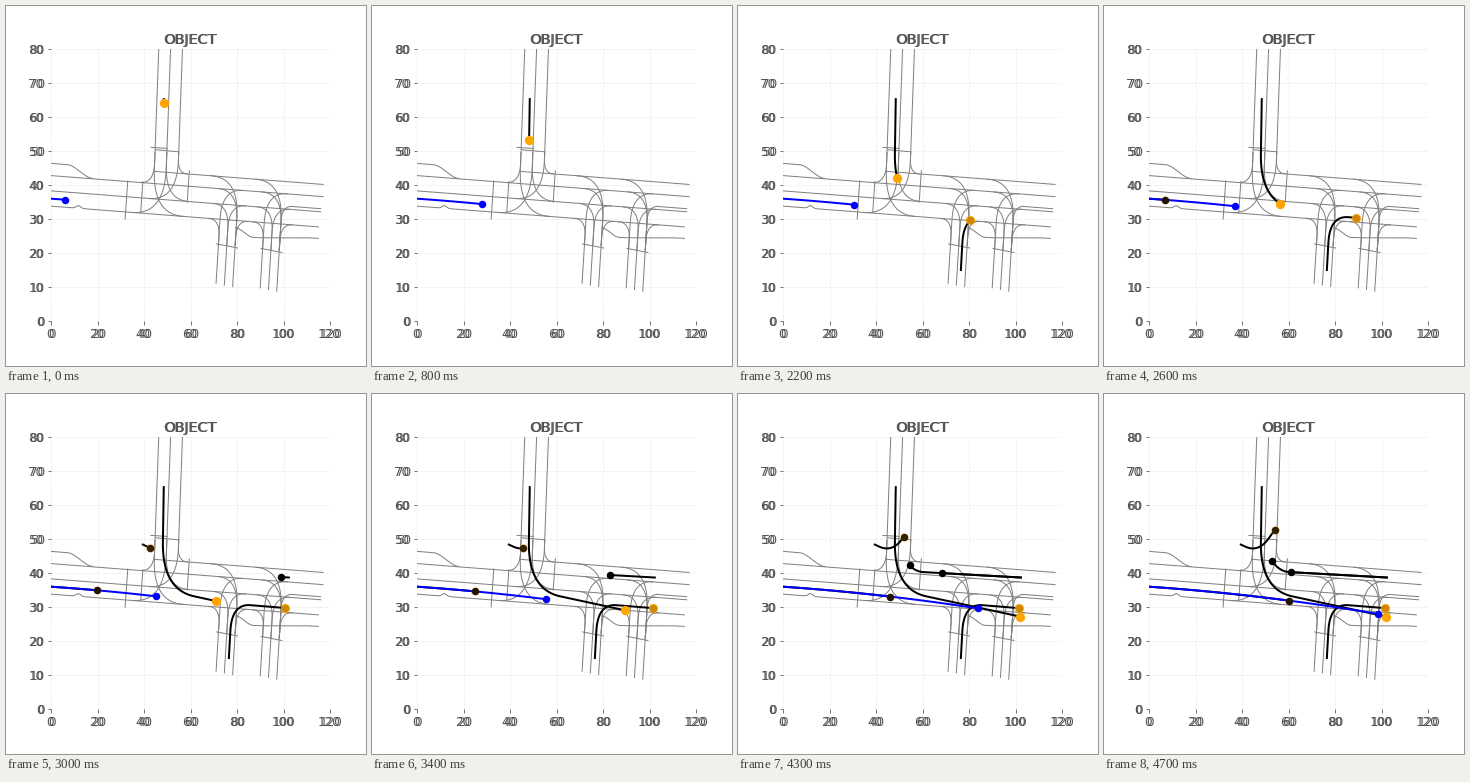
These frames come from a looping animation (360 by 360 pixels, 4.8 s). A matplotlib script:

```python
import numpy as np
import matplotlib.pyplot as plt
from matplotlib.animation import FuncAnimation

FRAMES, INTERVAL = 48, 100
INK, LANE, GRID = "#555555", "#808080", "#e9e9e9"
TILT = 0.053                     # downhill slope of the main road
LANES = (46.4, 42.8, 38.3, 33.8)  # main road heights at x = 0

plt.rcParams["font.family"] = "DejaVu Sans"
fig = plt.figure(figsize=(5, 5), dpi=72, facecolor="white")
ax = fig.add_axes([0.125, 0.125, 0.775, 0.755])
ax.set(xlim=(0, 120), ylim=(0, 80),
       xticks=range(0, 121, 20), yticks=range(0, 81, 10))
ax.tick_params(color=INK, length=3.5, width=0.8, labelbottom=False, labelleft=False)
ax.grid(color=GRID, linestyle="--", linewidth=0.7)
ax.set_axisbelow(True)
for spine in ax.spines.values():
    spine.set_visible(False)


def label(text, xy, dx, dy, ha, va, size=12, coords="data"):
    """Text struck twice, slightly apart."""
    for shift in (-0.7, 0.7):
        ax.annotate(text, xy, (dx + shift, dy), xycoords=coords, textcoords="offset points",
                    ha=ha, va=va, size=size, color=INK)


label("OBJECT", (0.5, 1), 0, 5, "center", "baseline", 14.4, "axes fraction")
for x in ax.get_xticks():
    label(f"{x:.0f}", (x, 0), 0, -7, "center", "top")
for y in ax.get_yticks():
    label(f"{y:.0f}", (0, y), -7, 0, "right", "center_baseline")


def smooth(x, a, b):
    s = np.clip((x - a) / (b - a), 0, 1)
    return s * s * (3 - 2 * s)


def bend(a, corner, b, r):
    """Straight legs joined by a rounded corner."""
    a, corner, b = (np.array(p, float) for p in (a, corner, b))
    p, q = (corner + r * (e - corner) / np.linalg.norm(e - corner) for e in (a, b))
    s = np.linspace(0, 1, 30)[:, None]
    return np.vstack([a, (1 - s) ** 2 * p + 2 * s * (1 - s) * corner + s ** 2 * q, b])


def road(x, y):
    ax.plot(x, y, color=LANE, lw=1, zorder=2)


def main_lane(c, x0, x1, change=lambda x: 0):
    x = np.linspace(x0, x1, 200)
    road(x, c - TILT * x + change(x))


def arm_lane(x0, lean, y0, y1):
    road([x0 + lean * y0, x0 + lean * y1], [y0, y1])


def turn(x0, lean, y0, c, side, r):
    """From a side arm into the main lane c; side is -1 for west, 1 for east."""
    x = (x0 + lean * c) / (1 + TILT * lean)
    y = c - TILT * x
    road(*bend((x0 + lean * y0, y0), (x, y), (x + side * r, y - side * r * TILT), r).T)


# Main road, with a merge and a lay-by in the west
top, upper, lower, bottom = LANES
main_lane(top, 0, 18, lambda x: -3.5 * smooth(x, 7, 18))
main_lane(top, 44.7, 117)
main_lane(upper, 0, 117)
main_lane(lower, 0, 116)
main_lane(bottom, 0, 115, lambda x: 0.8 * np.exp(-((x - 11.8) / 1.3) ** 2))
main_lane(39.2, 103, 116)
main_lane(31.6, 79.5, 115, lambda x: -2.4 * smooth(x, 79.5, 87) + 1.2 * smooth(x, 85, 115))

# Western stop lines
for x, y, drop in ((33, 41.2, 11.2), (39.5, 41, 9), (59.5, 44.2, 9.2)):
    road([x, x - drop * 0.1], [y, y - drop])

# North arm
NORTH, GAP = 42.1, 5.1
for i in range(3):
    arm_lane(NORTH + GAP * i, TILT, 80, 49.5)
for i, c, side, r in ((0, upper, -1, 6), (0, bottom, 1, 13), (1, bottom, -1, 14),
                      (1, lower, 1, 10), (2, lower, -1, 12), (2, top, 1, 4)):
    turn(NORTH + GAP * i, TILT, 49.5, c, side, r)
road([43, 50], [51.1, 50.8])
road([45, 55], [50.4, 49.8])

# South arms: inner lanes turn tightly, outer ones wide
for x0 in (70, 89.1):
    foot = 16 - 0.07 * x0
    stop = foot + 11.2
    for i in range(3):
        x = x0 + 3.6 * i
        arm_lane(x, 0.09, foot - 0.5 * i, stop)
        turn(x, 0.09, stop, LANES[3 - i], -1, 5 + 2 * i)
        turn(x, 0.09, stop, LANES[1 + i], 1, 9 - 2 * i)
    turn(x, 0.09, stop, top, -1, 12)
    road([x0 + 1.2, x0 + 10.2], [stop + 0.4, stop - 0.8])
turn(x, 0.09, stop, 39.2, 1, 4.5)


def slow(t, room, rate):
    return room * (1 - np.exp(-rate * t))


def push(t, gain, power):
    return gain * max(t, 0) ** power


def cruise_stop(t, start, brake, room, speed=4.05):
    return (speed * (min(t, brake) - start)
            + slow(max(t - brake, 0), room, speed / room))


def eastbound(x0):
    x = np.linspace(x0, 110, 120)
    return np.column_stack([x, 36 - 0.047 * x - 0.00035 * x ** 2])


class Agent:
    """Follows a path; travel(t) is the distance covered, negative while absent."""

    def __init__(self, path, travel, color="black", glow=0, z=4, top=8):
        self.path, self.travel = path, travel
        steps = np.linalg.norm(np.diff(path, axis=0), axis=1)
        self.length = np.concatenate([[0], np.cumsum(steps)])
        self.trail, = ax.plot([], [], color=color, lw=2, zorder=z)
        self.dots = [ax.plot([], [], "o", color=color, ms=7.5, mew=0, zorder=top)[0]]
        if glow:
            self.dots += ax.plot([], [], "o", color="orange", ms=9.3, mew=0,
                                 alpha=glow, zorder=top)

    def show(self, t):
        d = min(self.travel(t), self.length[-1])
        seen = np.empty((0, 2))
        if d > 0:
            here = [np.interp(d, self.length, axis) for axis in self.path.T]
            seen = np.vstack([self.path[self.length < d], here])
        self.trail.set_data(*seen.T)
        for dot in self.dots:
            dot.set_data(*seen[-1:].T)


westbound = bend((102.3, 38.7), (55, 40.5), (51.8, 45), 5.5)
agents = [
    Agent(eastbound(0), lambda t: slow(t - 25, 24, 0.35) + push(t - 31, 0.327, 1.7), glow=0.12),
    Agent(bend((39.5, 48.4), (47, 46), (54, 52.6), 6), lambda t: 0.8 * (t - 26), glow=0.2),
    Agent(westbound, lambda t: cruise_stop(t, 29.2, 39, 11.3)),
    Agent(westbound, lambda t: cruise_stop(t, 34.6, 43, 8.5)),
    Agent(eastbound(-5), lambda t: 11 + slow(t, 23.1, 0.36) + push(t - 20, 0.567, 1.46),
          color="blue", z=5),
    Agent(bend((48.5, 65.3), (47.8, 35.2), (102, 27.2), 14),
          lambda t: 1 + slow(t, 12.2, 0.3) + push(t - 13, 0.124, 2), glow=1, top=10),
    Agent(bend((76.5, 15), (77.8, 31), (101.3, 29.7), 8),
          lambda t: 1.25 * (t - 10) + push(t - 19, 0.09, 2), glow=0.82, top=10),
]


def update(k):
    for agent in agents:
        agent.show(k)
    return []


anim = FuncAnimation(fig, update, frames=FRAMES, interval=INTERVAL,
                     init_func=lambda: update(0), repeat=True, repeat_delay=0)
plt.show()
```
